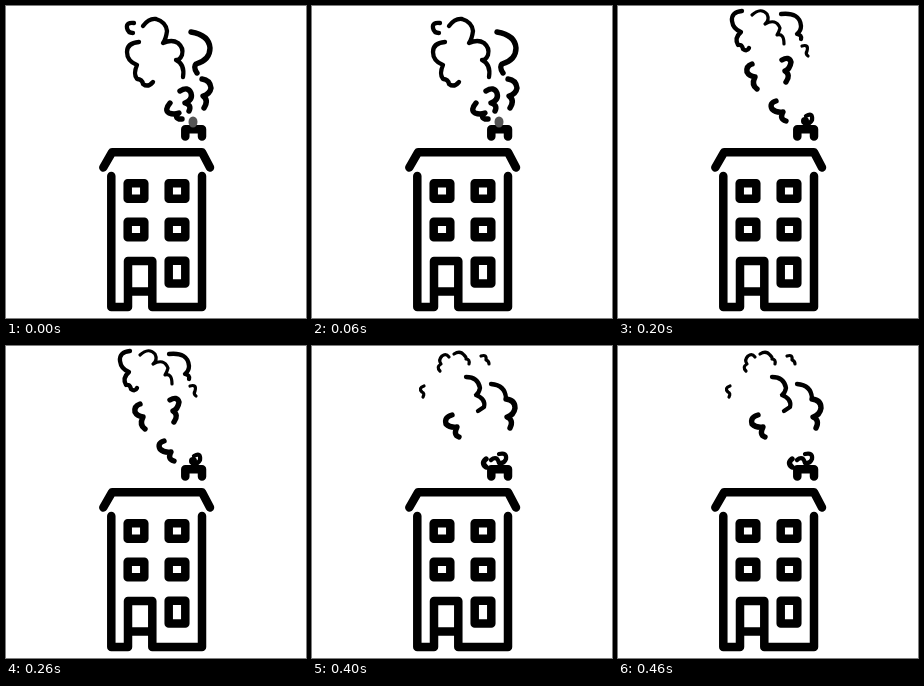
Animation, 300 px wide and 312 px high, one loop 0.5 s. Source, as an HTML page without scripts:

```html
<!DOCTYPE html>
<html lang="en">
<head>
<meta charset="utf-8">
<title>House with a smoking chimney</title>
<style>
  html, body { margin: 0; width: 100%; height: 100%; overflow: hidden; background: #fff; }
  svg { display: block; width: 300px; height: 312px; }
  path, rect { fill: none; stroke: #000; stroke-linecap: round; stroke-linejoin: round; }
  .house { stroke-width: 8.5px; }
  .thin path { stroke-width: 3.2px; }
  .mid path { stroke-width: 4.3px; }
  .bold path { stroke-width: 5.4px; }

  /* Five smoke poses take turns, each visible for a fifth of the loop */
  .pose { visibility: hidden; animation: show .5s step-end infinite; animation-delay: calc(var(--i) * .1s - .5s); }
  @keyframes show {
    0% { visibility: visible; }
    20%, 100% { visibility: hidden; }
  }
</style>
</head>
<body>
<svg viewBox="0 0 300 312">
  <defs>
    <rect id="window" x="-8.3" y="-7.8" width="16.6" height="15.6"/>
  </defs>
  <g class="house">
    <path d="M97.3 161.5L106 146.3H196L204 161.5"/>
    <path d="M105.3 170V301H122V255H146.3V301H196V170M122 285.5H146"/>
    <path d="M179.3 130.5V123.3H196V130.5"/>
    <use href="#window" x="130" y="185"/>
    <use href="#window" x="171" y="185"/>
    <use href="#window" x="130" y="223.5"/>
    <use href="#window" x="171" y="223.5"/>
    <rect x="162.7" y="254.8" width="16.6" height="22.7"/>
  </g>

  <g class="pose" style="--i:0">
    <g class="mid">
      <path d="M128 17Q120 16 121 22Q122 27 127 27"/>
      <path d="M137 20Q143 12 150 13Q160 16 161 25Q160 33 157 37Q166 33 172 37Q178 42 176 49Q174 54 170 54Q179 58 177 71"/>
      <path d="M133 36Q121 37 121 46Q121 55 131 59Q127 68 131 73Q136 73 137 78Q142 82 147 76"/>
    </g>
    <g class="bold">
      <path d="M185 26Q203 29 204 42Q204 54 190 58Q187 61 191 67"/>
      <path d="M196 73Q204 74 205 82Q204 88 197 90Q203 94 198 102"/>
      <path d="M174 85Q182 80 185 87Q187 94 179 97Q186 99 183 105"/>
      <path d="M164 97Q158 104 163 107Q168 109 173 107Q168 111 173 113H176"/>
    </g>
    <ellipse cx="187" cy="116" rx="4.5" ry="5.5" fill="#555"/>
  </g>

  <g class="pose" style="--i:1">
    <g class="thin"><path d="M129 7Q123 7 126 12"/></g>
    <g class="mid">
      <path d="M134 13Q138 5 146 6Q156 10 154 24Q162 22 166 28Q167 34 164 38Q172 40 171 52"/>
      <path d="M126 16Q116 19 117 27Q118 34 125 36Q120 44 124 47Q128 46 130 51Q133 51 135 48"/>
    </g>
    <g class="bold">
      <path d="M172 8Q188 8 193 22Q194 33 185 38Q190 42 188 46"/>
      <path d="M193 56Q203 56 203 64Q201 70 195 71Q200 74 197 80"/>
      <path d="M171 75Q179 71 182 78Q184 85 175 89Q183 91 181 97"/>
      <path d="M150 85Q143 88 147 94Q152 96 158 94Q153 99 157 102H160"/>
      <path d="M174 113Q169 117 174 121M184 119Q188 108 189 119"/>
    </g>
  </g>

  <g class="pose" style="--i:2">
    <g class="thin">
      <path d="M134 9Q143 1 149 8Q152 14 147 18Q158 12 162 22Q161 26 159 29Q166 27 166 38"/>
      <path d="M184 40Q191 38 189 45Q187 48 190 50"/>
    </g>
    <g class="mid">
      <path d="M124 5Q113 6 114 15Q115 23 123 26Q116 32 120 39Q124 38 125 43Q129 46 131 42"/>
      <path d="M163 8Q182 6 183 20Q183 25 179 28Q184 29 183 33"/>
    </g>
    <g class="bold">
      <path d="M164 54Q171 50 173 56Q172 63 167 65Q173 69 168 76"/>
      <path d="M134 58Q128 60 129 66Q131 70 137 71Q133 79 139 83"/>
      <path d="M158 95Q151 97 154 103Q158 107 165 106Q161 113 168 115"/>
    </g>
    <g class="mid"><path d="M188 110Q195 106 194 114Q192 118 187 118"/></g>
    <circle cx="187" cy="115" r="4"/>
  </g>

  <g class="pose" style="--i:3">
    <g class="thin">
      <path d="M131 9Q121 9 121 16Q122 22 126 23Q118 28 123 33L126 34"/>
      <path d="M178 116Q174 117 174 121"/>
    </g>
    <g class="mid">
      <path d="M168 8Q172 4 175 9Q176 13 174 16Q179 15 180 22"/>
      <path d="M121 43Q112 44 113 51Q114 58 121 59Q116 66 122 68Q127 67 127 72Q130 75 132 71"/>
      <path d="M141 9Q158 8 162 25Q162 30 160 33L164 37"/>
    </g>
    <g class="bold">
      <path d="M157 45Q165 42 167 49Q166 57 159 59Q166 62 163 69"/>
      <path d="M191 69Q200 68 200 76Q198 84 191 86Q197 89 192 96"/>
      <path d="M146 85Q140 88 143 93Q147 95 154 94Q151 102 158 102"/>
      <path d="M185 119Q187 108 189 119"/>
    </g>
  </g>

  <g class="pose" style="--i:4">
    <g class="thin">
      <path d="M137 11Q134 7 130 10Q126 14 129 18Q124 21 128 25"/>
      <path d="M142 8Q148 4 152 9Q155 12 154 13Q158 13 157 18"/>
      <path d="M169 10Q175 8 174 14Q177 15 177 18"/>
      <path d="M112 40Q106 42 110 46Q113 47 111 51"/>
    </g>
    <g class="mid">
      <path d="M154 31Q166 31 168 42Q167 47 164 49Q174 53 172 61L166 65"/>
      <path d="M179 38Q193 39 194 52"/>
      <path d="M187 108Q195 106 194 113Q192 118 187 117M179 114Q185 109 187 117"/>
    </g>
    <g class="bold">
      <path d="M194 53Q203 54 203 62Q202 69 195 71Q202 74 198 82"/>
      <path d="M140 69Q132 71 134 78Q138 82 145 81Q141 89 147 91"/>
      <path d="M174 113Q169 117 174 121"/>
    </g>
  </g>
</svg>
</body>
</html>
```
